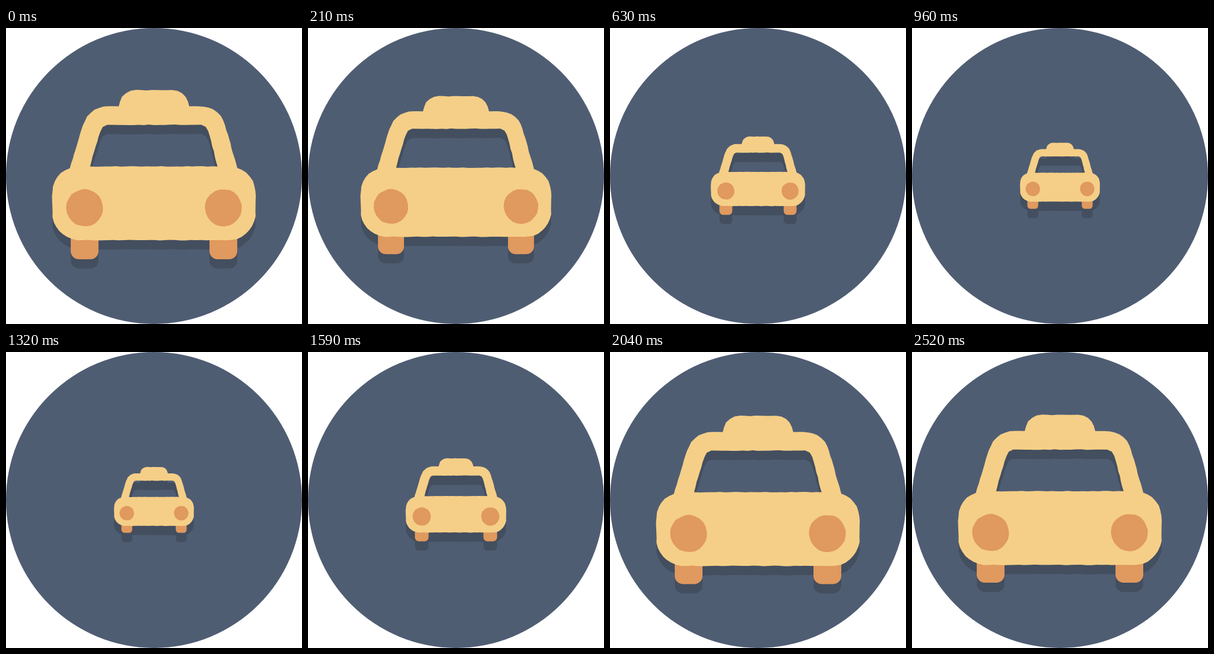
Recreate the animation shown at these times as an HTML page with a canvas. Size 512x512 px, loop 2550 ms.

```html
<!DOCTYPE html>
<html>
<head>
<meta charset="utf-8">
<style>
  html, body { margin: 0; width: 100%; height: 100%; overflow: hidden; background: #fff; }
  canvas { display: block; }
</style>
</head>
<body>
<canvas id="stage" width="512" height="512"></canvas>
<script>
const ctx = document.getElementById('stage').getContext('2d');
const LOOP = 2550, FAR = 0.392, DROP = 16;
const NIGHT = '#4f5d73', SHADOW = '#434e5f', YELLOW = '#f5cf87', ORANGE = '#e0995e';

let seed = 7;
const random = () => (seed = seed * 16807 % 2147483647) / 2147483647;

// Closed outline with a slightly uneven edge; corners between segments stay sharp.
function rough(...segments) {
  const path = new Path2D();
  for (const d of segments) {
    const curve = document.createElementNS('http://www.w3.org/2000/svg', 'path');
    curve.setAttribute('d', d);
    const length = curve.getTotalLength(), count = Math.ceil(length / 9);
    for (let i = 0; i <= count; i++) {
      const p = curve.getPointAtLength(length * i / count);
      const jitter = i % count ? 1.1 : 0;
      path.lineTo(p.x + (random() - 0.5) * jitter, p.y + (random() - 0.5) * jitter);
    }
  }
  path.closePath();
  return path;
}

const body = rough(
  'M110.500 242.500 L130 177 C138 149 152 135.500 176 135.500 H195',
  'M195 135.500 C197 118 209 107.500 225 107.500 H287 C303 107.500 314 118 317 135.500',
  'M317 135.500 H337 C360 135.500 374 149 381 175 L400 242',
  'M400 242 C419 247 432 264 432 287 V319 A48 48 0 0 1 384 367 H128 A48 48 0 0 1 80 319 V287 C80 264 93 248 110.500 242.500');
body.addPath(rough(
  'M145.500 239.500 L160 188 C164 173 167 167.500 177 167.500 H335 C345 167.500 349 173 352 186 L366 239.500',
  'M366 239.500 H145.500'));

const wheels = new Path2D(), lights = new Path2D();
for (const x of [136, 376]) {
  wheels.roundRect(x - 24, 340, 48, 60, 14);
  lights.addPath(rough(`M${x - 32} 311 a32 32 0 0 1 64 0 a32 32 0 0 1 -64 0`));
}

const clamp = x => Math.min(1, Math.max(0, x));
const ease = x => (1 - Math.cos(Math.PI * clamp(x))) / 2;

// Suspension: time, body offset, wheel offset
const sway = [
  [0, 0, 0], [390, 2.1, 0.5], [630, 1.2, 1], [1320, 3.1, 0.8], [1800, 2.6, 0.6],
  [2070, 3, 1.5], [2350, 0, 0], [2520, 1.3, -1], [LOOP, 0, 0]
];
function swayAt(t) {
  const i = sway.findIndex(key => key[0] > t);
  const a = sway[i - 1], b = sway[i], k = ease((t - a[0]) / (b[0] - a[0]));
  return [1, 2].map(n => a[n] + (b[n] - a[n]) * k);
}

function scaleAt(t) {
  const away = ease(clamp(t / 778) ** 1.2) - ease((t - 1434) / 585);
  return 1 - (1 - FAR) * away;
}

function drawCar(t, drop, wheelColor, bodyColor, lightColor) {
  const s = scaleAt(t), [bodyY, wheelY] = swayAt(t);
  const part = (path, color, dy) => {
    ctx.setTransform(s, 0, 0, s, 256 * (1 - s), 256 * (1 - s) + drop + dy * s);
    ctx.fillStyle = color;
    ctx.fill(path, 'evenodd');
  };
  part(wheels, wheelColor, wheelY);
  part(body, bodyColor, bodyY);
  part(lights, lightColor, bodyY);
}

function draw(now) {
  const t = now % LOOP;
  ctx.setTransform(1, 0, 0, 1, 0, 0);
  ctx.clearRect(0, 0, 512, 512);
  ctx.fillStyle = NIGHT;
  ctx.beginPath();
  ctx.arc(256, 256, 256, 0, 2 * Math.PI);
  ctx.fill();
  drawCar(t, DROP, SHADOW, SHADOW, SHADOW);
  drawCar(t, 0, ORANGE, YELLOW, ORANGE);
}

const start = performance.now();
function tick() {
  draw(performance.now() - start);
  requestAnimationFrame(tick);
}
tick();
</script>
</body>
</html>
```
